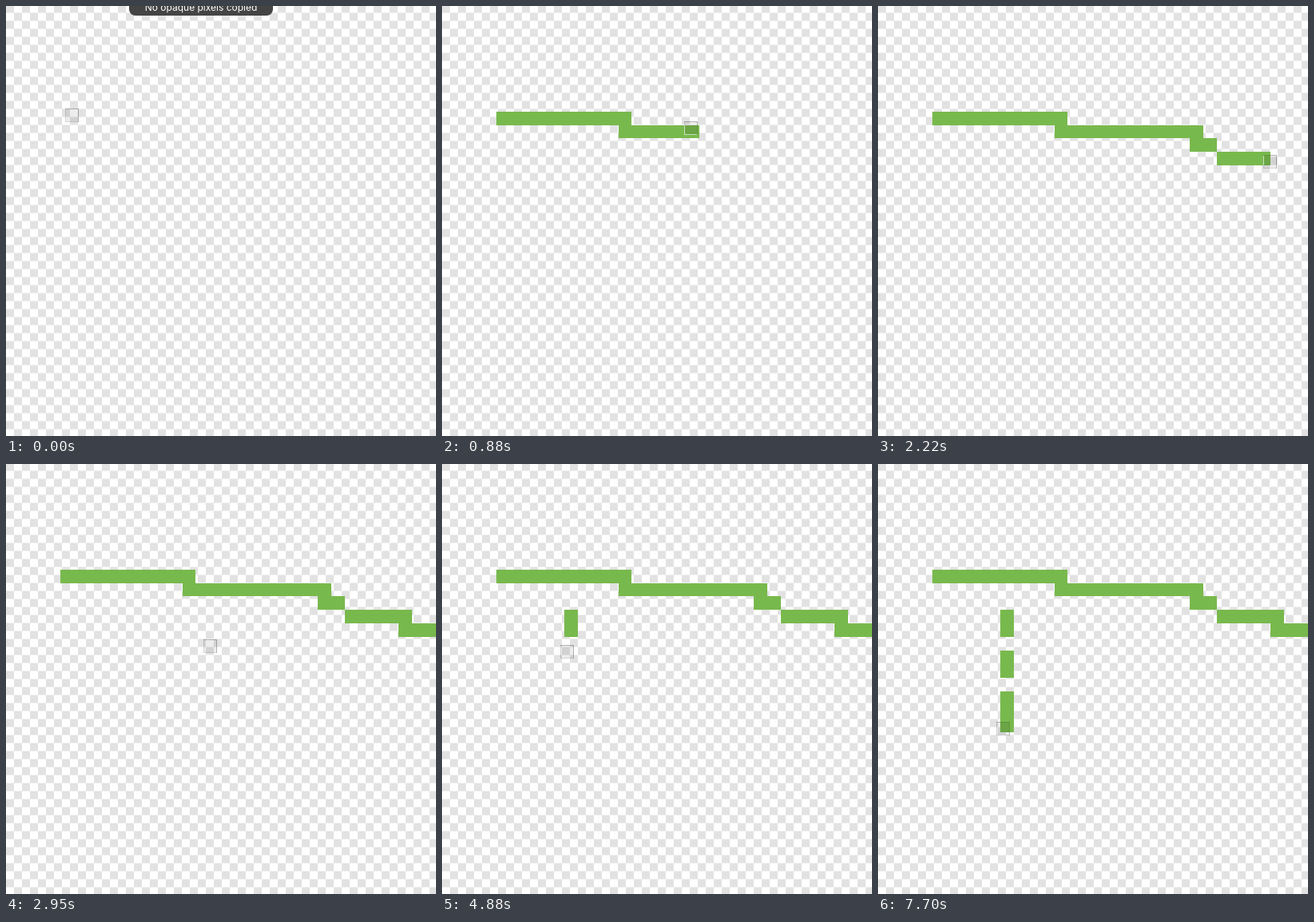
Animation of 538x537 px, one loop 8000 ms. Source, as an HTML page with a canvas:

```html
<!DOCTYPE html>
<html lang="en">
<head>
<meta charset="utf-8">
<title>Pixel editor</title>
<style>
  html, body { margin: 0; width: 100%; height: 100%; overflow: hidden; }
  body { position: relative; background: #fff; }
  canvas { position: absolute; left: 0; top: 0; }
  #toast {
    position: absolute; left: 154px; top: -18px; width: 180px; height: 30px;
    border-radius: 8px; background: #444; color: #fff;
    font: 12px/39px Inter, sans-serif; text-align: center; white-space: nowrap;
  }
</style>
</head>
<body>
<canvas id="stage" width="538" height="537"></canvas>
<div id="toast">No opaque pixels copied</div>
<script>
const ctx = document.getElementById('stage').getContext('2d');
const toast = document.getElementById('toast');
const W = 538, H = 537;
const LOOP = 8000, TICK = 148, LEAD = 12;
const DRAG_END = 18, CLICKS_FROM = 26, CLICK_COL = 5;
const PEN = 17, GREEN = '#78b94d';

// Pointer moves: start tick, end tick, x, y
const moves = [
  [0, 0, 74, 128], [0, 6, 303, 144], [6, 8, 330, 145], [8, 11, 406, 165],
  [11, DRAG_END, 532, 200],
  [20, 20, 247, 219], [20, 24, 150, 183],
  [CLICKS_FROM, 29, 149, 205], [31, 33, 148, 226], [35, 37, 145, 245],
  [38, 41, 150, 281], [43, 45, 143, 304], [47, 50, 148, 322], [52, 52, 148, 322]
];
// First and last column of the dragged line in each row
const runs = [[0, 9], [9, 19], [19, 20], [21, 25], [25, 27]];

const colX = col => Math.round(68.1 + col * 16.935);
const rowY = row => Math.round(131.6 + row * 16.92);
const colOf = x => Math.floor((x + PEN / 2 - 68.1) / 16.935);
const rowOf = y => Math.floor((y + PEN / 2 - 131.6) / 16.92);
const smooth = p => p * p * (3 - 2 * p);

function pointerAt(tick) {
  let x = 0, y = 0;
  for (const [from, to, toX, toY] of moves) {
    if (tick < from) break;
    const p = tick >= to ? 1 : smooth((tick - from) / (to - from));
    x += (toX - x) * p;
    y += (toY - y) * p;
  }
  return [Math.round(x), Math.round(y)];
}

function paintedPath(tick) {
  const path = new Path2D();
  const add = (row, from, to) =>
    path.rect(colX(from), rowY(row), colX(to + 1) - colX(from), rowY(row + 1) - rowY(row));
  if (tick > 0) {
    const reach = colOf(pointerAt(Math.min(tick, DRAG_END))[0]);
    runs.forEach(([from, to], row) => {
      if (from <= reach) add(row, from, Math.min(to, reach));
    });
  }
  // Each later move leaves from a click on the cell below the pointer
  for (const [from] of moves)
    if (from >= CLICKS_FROM && from <= tick) add(rowOf(pointerAt(from)[1]), CLICK_COL, CLICK_COL);
  return path;
}

function drawChecker() {
  ctx.fillStyle = '#fff';
  ctx.fillRect(0, 0, W, H);
  ctx.fillStyle = '#e2e2e2';
  for (let row = 0; row < 54; row++)
    for (let col = row % 2; col < 54; col += 2)
      ctx.fillRect(col * 10, row * 10 - 1.5, 10, 10);
}

function drawPointer(x, y, fill, strong, weak) {
  const end = PEN - 1;
  ctx.fillStyle = fill;
  ctx.fillRect(x, y, PEN, PEN);
  ctx.fillStyle = strong;
  ctx.fillRect(x, y, PEN, 1);
  ctx.fillRect(x + end, y + 1, 1, end);
  ctx.fillStyle = weak;
  ctx.fillRect(x, y + 1, 1, end);
  ctx.fillRect(x + 1, y + end, end - 1, 1);
}

function draw(tick) {
  const [x, y] = pointerAt(tick);
  const painted = paintedPath(tick);
  drawChecker();
  drawPointer(x, y, 'rgba(0,0,0,.07)', 'rgba(0,0,0,.25)', 'rgba(0,0,0,.1)');
  ctx.fillStyle = GREEN;
  ctx.fill(painted);
  ctx.save();
  ctx.clip(painted);
  const edge = tick <= DRAG_END ? 'rgba(255,255,255,.65)' : 'rgba(0,0,0,.12)';
  drawPointer(x, y, 'rgba(0,0,0,.11)', 'rgba(0,0,0,.1)', edge);
  ctx.restore();
  toast.style.visibility = tick ? 'hidden' : 'visible';
}

const start = performance.now();
function loop() {
  const time = (performance.now() - start) % LOOP;
  draw(Math.floor((time + LEAD) / TICK));
  requestAnimationFrame(loop);
}
loop();
</script>
</body>
</html>
```
